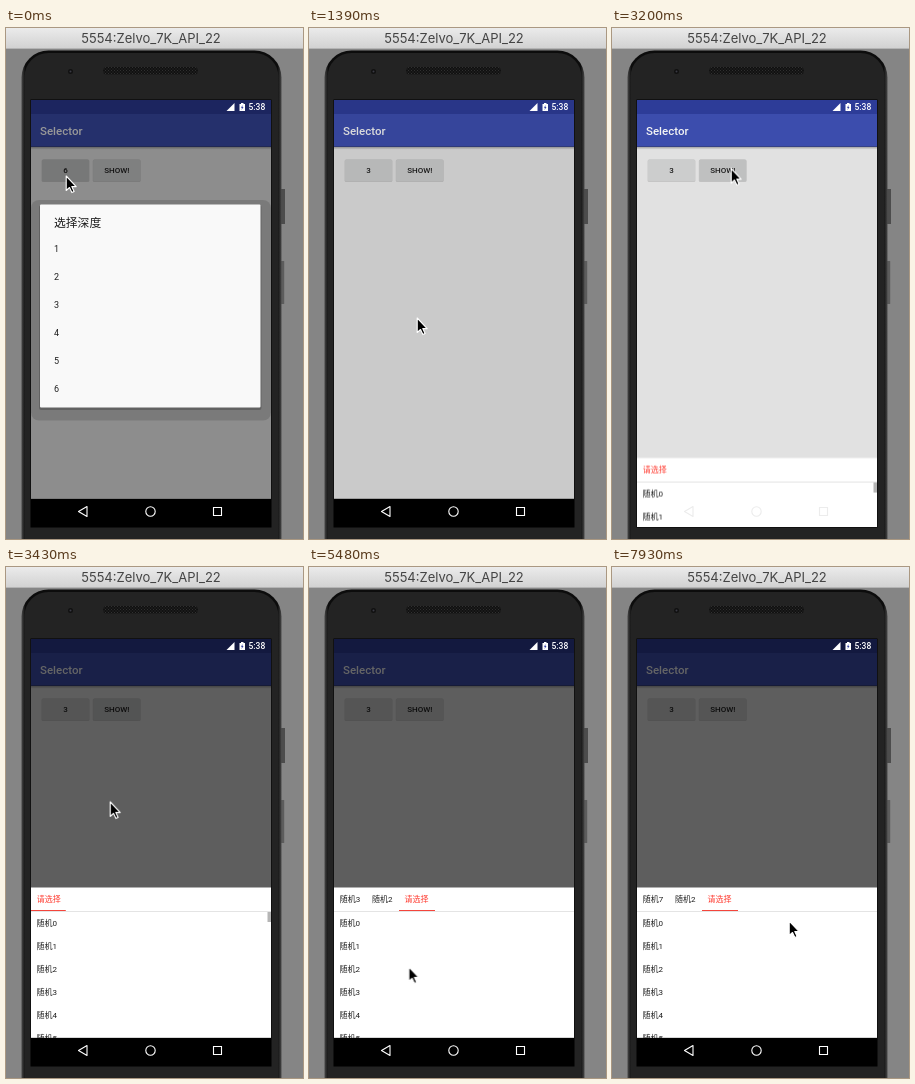
An HTML page that plays this animation: 297x511 px, repeating every 8000 ms.

```html
<!DOCTYPE html>
<html lang="zh-CN">
<head>
<meta charset="utf-8">
<title>Selector</title>
<style>
html, body { margin: 0; width: 100%; height: 100%; overflow: hidden; background: #858585; }
svg { display: block; width: 297px; height: 511px; font: 8px Roboto, "Noto Sans CJK SC", "Noto Sans CJK", sans-serif; }
.title { font: 13px Inter, "Open Sans", sans-serif; fill: #444; }
.mid { text-anchor: middle; }
.bold { font-weight: 500; }
.item { fill: #1e1e1e; }
.on { fill: #ff3b30; }
</style>
</head>
<body>
<svg viewBox="0 0 297 511">
  <defs>
    <linearGradient id="bar" x2="0" y2="1"><stop stop-color="#ebebeb"/><stop offset="1" stop-color="#d2d2d2"/></linearGradient>
    <linearGradient id="shade" x2="0" y2="1"><stop stop-opacity=".3"/><stop offset="1" stop-opacity="0"/></linearGradient>
    <linearGradient id="rim"><stop stop-color="#484848"/><stop offset=".015" stop-color="#0c0c0c"/><stop offset=".985" stop-color="#0c0c0c"/><stop offset="1" stop-color="#484848"/></linearGradient>
    <pattern id="mesh" width="3" height="3" patternUnits="userSpaceOnUse"><path fill="#111" d="M0 0h3v3h-3z"/><path fill="#303030" d="M0 0h1v1h-1zM1.5 1.5h1v1h-1z"/></pattern>
    <clipPath id="screen"><path d="M25 72h240v426.700h-240z"/></clipPath>
    <clipPath id="rows"><path d="M25 345h240v125.700h-240z"/></clipPath>
  </defs>

  <path fill="#858585" d="M0 0h297v511h-297z"/>
  <path fill="#4c4c4c" d="M275 161h4v35h-4z"/>
  <path fill="#5c5c5c" d="M275 233h3.200v43h-3.200z"/>
  <rect x="15.500" y="22.500" width="260" height="530" rx="27" fill="url(#rim)"/>
  <rect x="18.500" y="25" width="254" height="530" rx="24" fill="#232323"/>
  <rect x="97" y="39" width="95" height="7.500" rx="3.500" fill="url(#mesh)"/>
  <circle cx="64.500" cy="43.500" r="2.500" fill="#111"/><circle cx="64.500" cy="43.500" r="1" fill="#3a3a44"/>
  <path fill="url(#bar)" d="M0 0h297v20h-297z"/>
  <path fill="#b4b4b4" d="M0 20h297v1h-297z"/>
  <text class="title mid" x="145" y="15">5554:Zelvo_7K_API_22</text>

  <path fill="#000" d="M24.500 71.500h241v428h-241z"/>
  <path fill="#ececec" d="M25 118.700h240v352h-240z"/>
  <path fill="#303f9f" d="M25 72h240v14h-240z"/>
  <path fill="#3f51b5" d="M25 86h240v32.700h-240z"/>
  <path fill="url(#shade)" d="M25 118.700h240v3h-240z"/>
  <text class="bold" x="34" y="107" font-size="11.500" fill="#fff">Selector</text>
  <g id="buttons"></g>
  <path id="dim" d="M25 72h240v398.700h-240z"/>
  <g fill="#fff">
    <path d="M228.500 75v8h-8z"/>
    <path d="M233.500 76h1.500v-1h2.500v1h1.500v7h-5.500z"/>
    <path fill="#303f9f" d="M236.800 77l-2 2.800h1.200l-.5 2.200 2-3h-1.200z"/>
    <text class="bold" x="242.500" y="82" font-size="8.500">5:38</text>
  </g>

  <g id="dialog">
    <rect x="25" y="172" width="240" height="220.500" rx="8" opacity=".13"/>
    <rect x="33" y="177" width="222.500" height="205" rx="2" opacity=".2"/>
    <rect x="34" y="176.500" width="220.500" height="203" rx="1" fill="#f9f9f9"/>
    <text class="item" x="48" y="199.300" font-size="11.800">选择深度</text>
  </g>

  <g clip-path="url(#screen)">
    <g id="sheet">
      <path fill="#fff" d="M25 320.500h240v150.200h-240z"/>
      <path fill="#e4e4e4" d="M25 344h240v1h-240z"/>
      <g id="tabs"></g>
      <rect id="line" y="342.700" width="1" height="1.600" fill="#f4453c"/>
      <g id="lists" clip-path="url(#rows)"></g>
      <path id="thumb" fill="#b5b5b5" d="M261.500 345h3.500v10h-3.500z"/>
    </g>
  </g>
  <g id="nav" fill="none" stroke="#fff" stroke-width="1.100">
    <path d="M81 478.500v10l-8.500-5z" stroke-linejoin="round"/>
    <circle cx="144.500" cy="483.500" r="4.700"/>
    <path d="M207.500 479.500h8v8h-8z"/>
  </g>
  <g id="cursor">
    <path d="M.2 0V14.500L3.500 11.500L5.900 16.600L8.100 15.600L5.800 10.600H10.200Z" stroke="#fff" stroke-width="1.100" stroke-linejoin="round"/>
  </g>
</svg>
<script>
const LOOP = 8000;
const $ = id => document.getElementById(id);

function add(parent, tag, attrs = {}, text = '') {
  const el = document.createElementNS('http://www.w3.org/2000/svg', tag);
  for (const k in attrs) el.setAttribute(k, attrs[k]);
  el.textContent = text;
  return parent.appendChild(el);
}

// steps: [time, value, easing towards the next step]
function run(el, prop, steps) {
  const all = steps.slice();
  if (all[0][0] > 0) all.unshift([0, all[0][1]]);
  const last = all[all.length - 1];
  if (last[0] < LOOP) all.push([LOOP, last[1]]);
  el.animate(
    all.map(([t, v, easing = 'linear']) => ({ offset: t / LOOP, [prop]: v, easing })),
    { duration: LOOP, iterations: Infinity });
}

const show = (el, from, to = LOOP) => run(el, 'opacity', [
  ...(from > 0 ? [[0, 0], [from, 0]] : []), [from, 1], [to, 1],
  ...(to < LOOP ? [[to, 0], [LOOP, 0]] : [])]);

// Buttons; returns the press tint
function button(x) {
  const box = { y: 131.5, height: 21.7, rx: 1.5 };
  add($('buttons'), 'rect', { ...box, x: x - .4, width: 47.8, height: 22.6, opacity: .14 });
  add($('buttons'), 'rect', { ...box, x, width: 47, fill: '#d6d7d7' });
  return add($('buttons'), 'rect', { ...box, x, width: 47 });
}
const label = (x, s) => add($('buttons'), 'text', { class: 'bold mid item', x, y: 145.4 }, s);
run(button(36), 'opacity', [[0, .06], [60, .06], [350, 0]]);
run(button(87.2), 'opacity', [[0, 0], [3170, 0], [3190, .06], [3260, .06], [3480, 0]]);
show(label(59.5, '6'), 0, 1240);
show(label(59.5, '3'), 1240);
label(110.8, 'SHOW!');

// Depth dialog
for (let i = 0; i < 6; i++)
  add($('dialog'), 'text', { class: 'item', x: 48, y: 224.4 + 28 * i, 'font-size': 9 }, i + 1);
run($('dialog'), 'opacity', [[0, 1], [1240, 1], [1370, 0]]);
run($('dim'), 'opacity', [[0, .4], [120, .6], [1240, .6], [1436, 0], [3185, 0], [3420, .6]]);

// Tabs: start, end, labels, active index
const ask = '请选择', pick = n => '随机' + n;
const tabX = [30.7, 63, 95.5];
[
  [0, 4160, [ask], 0],
  [4160, 4910, [pick(3), ask], 1],
  [4910, 6120, [pick(3), pick(2), ask], 2],
  [6120, 6930, [pick(3), pick(2), ask], 0],
  [6930, 7570, [pick(7), ask], 1],
  [7570, LOOP, [pick(7), pick(2), ask], 2]
].forEach(([from, to, names, active]) => {
  const g = add($('tabs'), 'g');
  names.forEach((s, i) =>
    add(g, 'text', { class: i === active ? 'on' : 'item', x: tabX[i], y: 334.6 }, s));
  show(g, from, to);
});

// Lists
function list(first, checked) {
  const g = add($('lists'), 'g');
  for (let i = 0; i < 6; i++) {
    const n = first + i;
    add(g, 'text', { class: n === checked ? 'on' : 'item', x: 30.5, y: 359.3 + 22.85 * i }, pick(n));
  }
  if (checked !== undefined)
    add(g, 'path', { d: 'M57.5 356.5l2.700 2.800l5.500-6', fill: 'none', stroke: '#ff3b30' });
  return g;
}
const top0 = list(0), back = list(3, 3);
run(top0, 'opacity', [[0, 1], [6120, 1], [6120, 0], [6930, 0], [6930, 1]]);
show(back, 6120, 6930);

// Sheet, indicator, scroll thumb
show($('sheet'), 3170);
run($('sheet'), 'transform', [
  [3165, 'translateY(150px)', 'cubic-bezier(.33,.67,.67,1)'], [3415, 'translateY(0px)']]);
run($('nav'), 'stroke', [[0, '#fff'], [3170, '#fff'], [3170, '#ececec'], [3330, '#ececec'], [3330, '#fff']]);
run($('thumb'), 'opacity', [[0, 1], [4370, 1], [4600, 0]]);

const slide = 'cubic-bezier(.4,0,.2,1)';
const span = (x, w) => `translateX(${x}px) scaleX(${w})`;
const ends = [span(25, 36), span(57.5, 36), span(90, 36), span(25, 32.5)];
run($('line'), 'transform', [
  [3200, span(25, 0), slide], [3500, ends[0]],
  [4160, ends[0], slide], [4460, ends[1]],
  [4910, ends[1], slide], [5210, ends[2]],
  [6135, ends[2], slide], [6435, ends[3]],
  [6930, ends[3], slide], [7230, ends[1]],
  [7570, ends[1], slide], [7870, ends[2]]
]);

// Pointer: each move is start, end, x, y, easing
const at = (x, y) => `translate(${x}px,${y}px)`;
let here = at(60, 148);
const path = [[0, here]];
[
  [60, 830, 108, 290],
  [1450, 1970, 107, 149],
  [2450, 2630, 113, 128],
  [2630, 2810, 119, 140.5],
  [3200, 3430, 104, 234, 'ease-in'],
  [3430, 3790, 112, 418, 'ease-out'],
  [4280, 4570, 114, 394],
  [4950, 5220, 109, 411],
  [5370, 5800, 41, 330],
  [6170, 6300, 42, 342, 'ease-in'],
  [6300, 6550, 104, 441, 'ease-out'],
  [6980, 7250, 118, 394],
  [7600, 7930, 177, 354]
].forEach(([from, to, x, y, ease = 'ease-in-out']) => {
  path.push([from, here, ease]);
  here = at(x, y);
  path.push([to, here]);
});
run($('cursor'), 'transform', path);
</script>
</body>
</html>
```
